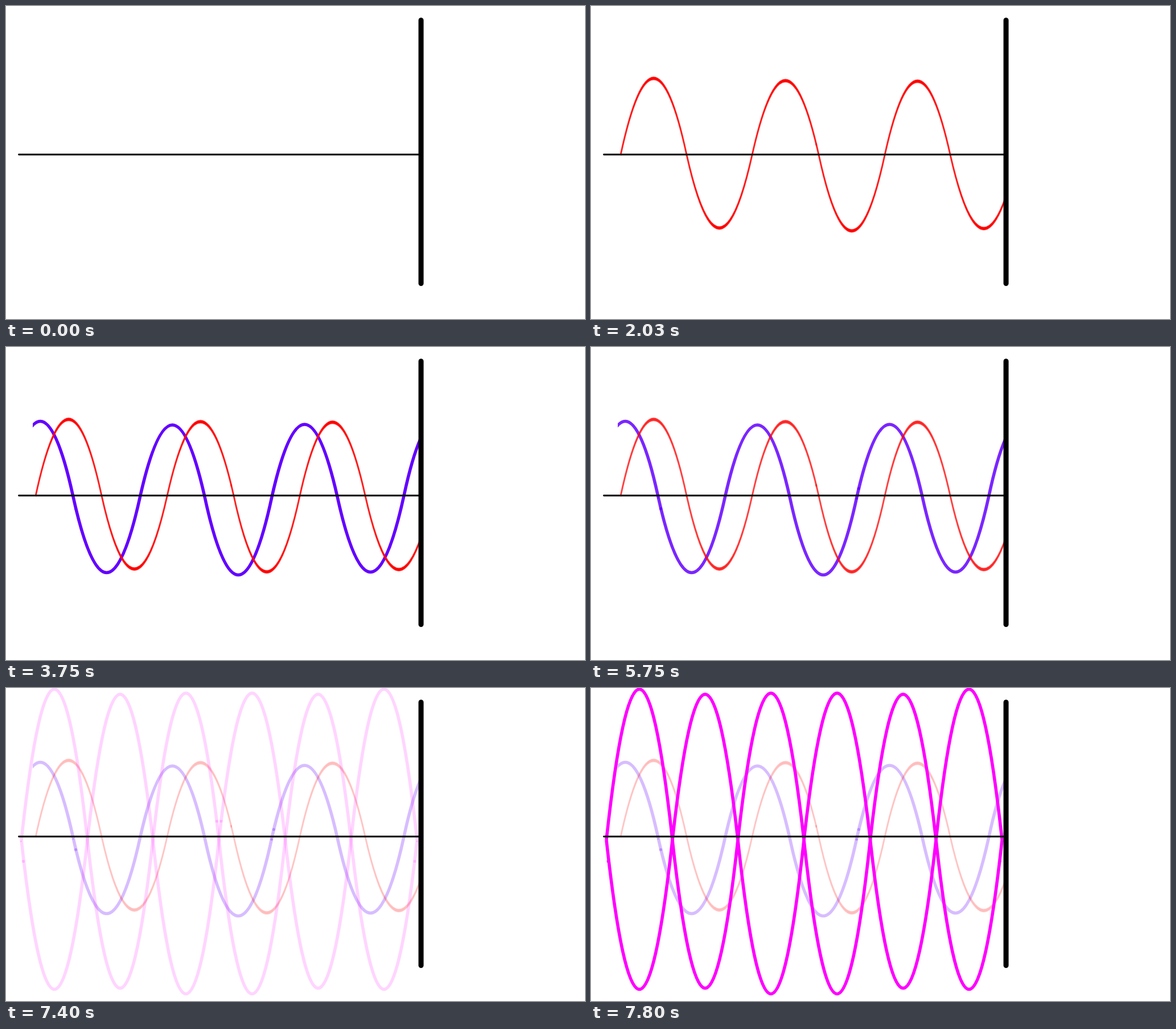
Animation, 1017 px wide and 550 px high, one loop 8 s. Source, as an HTML page:

```html
<!DOCTYPE html>
<html lang="en">
<head>
<meta charset="utf-8">
<title>Standing wave</title>
<style>
html, body { margin: 0; width: 100%; height: 100%; overflow: hidden; background: #fff; }
svg { position: absolute; left: 0; top: 0; width: 1017px; height: 550px; }
path, line { fill: none; stroke-linejoin: round; }
svg, svg * { animation: 8s linear -4ms infinite; }

.in { animation-name: wipe-right; }
.in path { stroke: #f00; }
.in ellipse { fill: #f00; }
.back { animation-name: wipe-left; }
.back path { stroke: #6400ff; stroke-width: 5.6; }
.back circle { fill: #6400ff; }
.in *, .back * { animation-name: dim; }
.sum path { stroke: #f0f; stroke-width: 5.6; }
.sum circle { fill: #f0f; }
.sum * { animation-name: appear; }
.frame line { stroke: #000; stroke-linecap: round; }

@keyframes wipe-right {
  0%, 6.125% { clip-path: inset(0 975px 0 0); animation-timing-function: steps(19); }
  25.125%, 100% { clip-path: inset(0 291px 0 0); }
}
@keyframes wipe-left {
  0%, 25.125% { clip-path: inset(0 291px 0 726px); animation-timing-function: step-end; }
  26.125% { clip-path: inset(0 291px 0 702px); animation-timing-function: step-end; }
  27.375% { clip-path: inset(0 291px 0 669.25px); animation-timing-function: steps(18); }
  45.375% { clip-path: inset(0 291px 0 79.75px); animation-timing-function: step-end; }
  46.875%, 100% { clip-path: inset(0 291px 0 47px); }
}
@keyframes dim {
  0%, 70.875% { opacity: 1; animation-timing-function: steps(5); }
  75.875%, 100% { opacity: .26; }
}
@keyframes appear {
  0%, 91.5% { opacity: 0; animation-timing-function: steps(6); }
  97.5%, 100% { opacity: 1; }
}
</style>
</head>
<body>
<svg class="back">
  <path id="back"/>
  <circle cx="118" cy="265" r="1.3"/>
  <circle cx="122.5" cy="284" r="2.6"/>
  <circle cx="466.5" cy="266" r="2.3"/>
  <circle cx="470.3" cy="248.5" r="2.6"/>
</svg>
<svg class="in">
  <path id="in"/>
  <ellipse cx="395.5" cy="243" rx="1.1" ry="2.4"/>
</svg>
<svg class="sum">
  <path id="up"/>
  <path id="down"/>
  <circle cx="26.5" cy="269.5" r="1.4"/>
  <circle cx="30.3" cy="304.5" r="2.6"/>
  <circle cx="370.3" cy="234" r="2.6"/>
  <circle cx="377.8" cy="234" r="2.6"/>
  <circle cx="718" cy="304.5" r="2.6"/>
  <circle cx="722" cy="269.5" r="1.4"/>
</svg>
<svg class="frame">
  <line x1="22.5" y1="261" x2="726" y2="261" stroke-width="2.8"/>
  <line x1="729" y1="25" x2="729" y2="487.5" stroke-width="9"/>
</svg>
<script>
// Parabolic arcs between axis crossings; tips holds the extreme y of each arc.
// A pen wider in y than in x comes from a scaled stroke.
function wave(id, base, nodes, tips, penX = 1, penY = 1) {
  const at = (x, y) => `${x / penX} ${y / penY} `;
  let d = 'M' + at(nodes[0], base);
  tips.forEach((tip, i) => {
    const mid = (nodes[i] + nodes[i + 1]) / 2;
    d += 'Q' + at(mid, 2 * tip - base) + at(nodes[i + 1], base);
  });
  const path = document.getElementById(id);
  path.setAttribute('d', d);
  if (penX !== penY) path.setAttribute('transform', `scale(${penX} ${penY})`);
}

const sumNodes = [27, 143, 258, 374, 490.5, 606, 722];
wave('in', 261.5, [52, 168, 283, 400, 516, 631, 749], [127, 390, 131, 395, 132, 391], 2.3, 5.7);
wave('back', 261, [3, 117.5, 236, 348.5, 467.5, 581.5, 699, 812], [130.5, 396.5, 137, 400.5, 136, 395.5, 130]);
wave('up', 267, sumNodes, [2, 527.5, 9, 537.5, 11, 529.5]);
wave('down', 267, sumNodes, [529.5, 11, 537.5, 9, 527.5, 2]);
</script>
</body>
</html>
```
